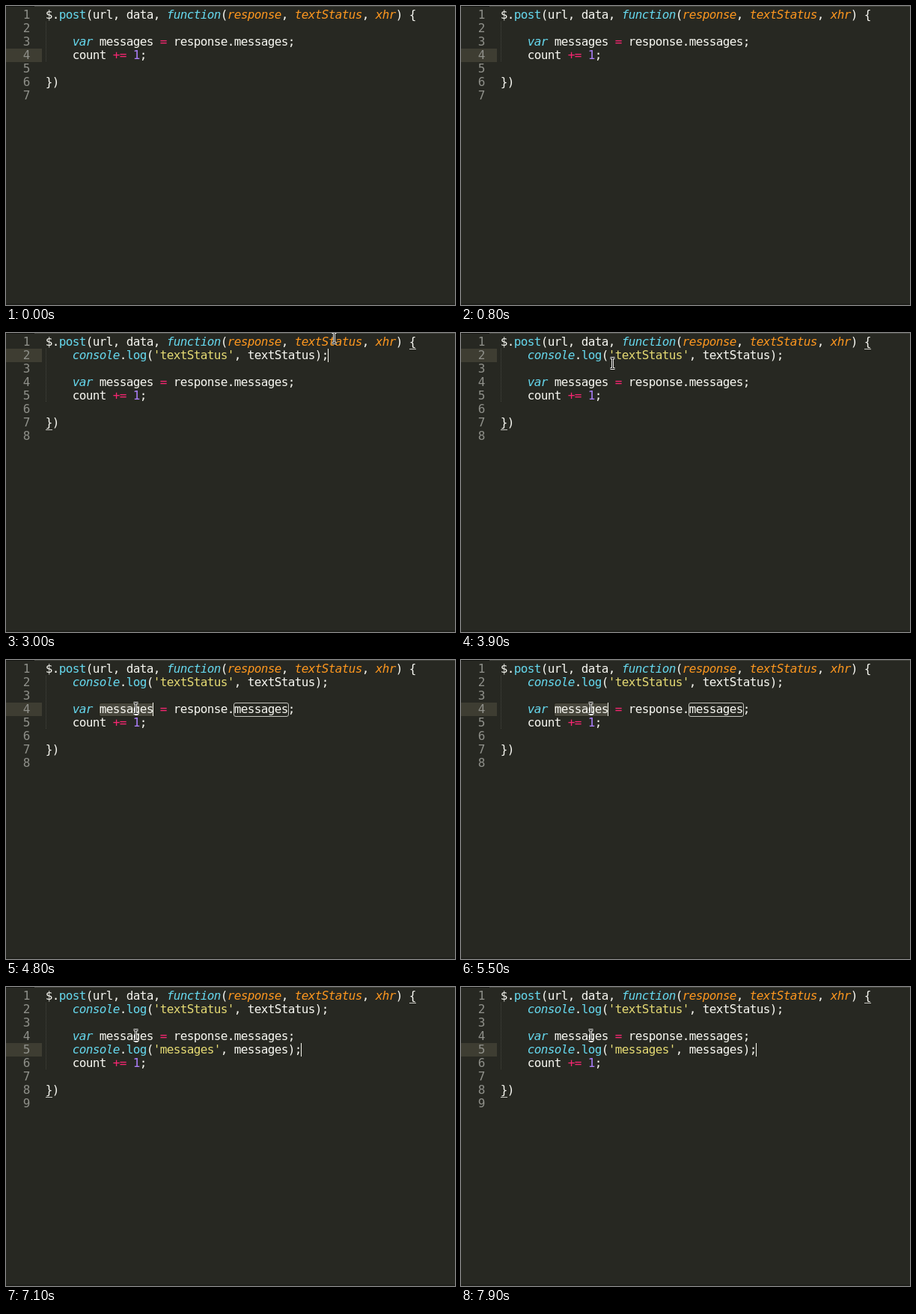
An HTML page with a canvas that plays this animation: 600x400 px, repeating every 8 s.

```html
<!DOCTYPE html>
<html lang="en">
<head>
<meta charset="utf-8">
<title>Code editor</title>
<style>
  html, body { margin: 0; width: 600px; height: 400px; overflow: hidden; background: #272822; }
  canvas { display: block; }
</style>
</head>
<body>
<canvas width="600" height="400"></canvas>
<script>
const ctx = document.querySelector('canvas').getContext('2d');
const LOOP = 8000, STEP = 100, BLINK = 1040;
const LEFT = 53, TOP = 3, ROW = 18, COL = 9;
const FONT = '16px "DejaVu Sans Mono", monospace';

// Tighten the tracking so that every character fills one column.
ctx.font = FONT;
const TRACKING = COL - ctx.measureText('0').width;

const COLORS = { w: '#f8f8f2', c: '#66d9ef', i: '#66d9ef', o: '#fd971f', p: '#f92672', n: '#ae81ff', y: '#e6db74' };
const ITALIC = 'io';

// Each part of a line starts with its style letter.
const HEAD = 'w$.|cpost|w(url, data, |ifunction|w(|oresponse|w, |otextStatus|w, |oxhr|w) {';
const VAR = 'w    |ivar|w messages |p=|w response.messages;';
const COUNT = 'w    count |p+=|w |n1|w;';
const log = name => `w    |iconsole|w.|clog|w(|y'${name}'|w, ${name});`;

function codeAt(t) {
  const lines = [HEAD, 'w', VAR, COUNT, 'w', 'w})', 'w'];
  if (t >= 2900) lines.splice(1, 0, log('textStatus'));
  if (t >= 5800) lines.splice(4, 0, log('messages'));
  return lines;
}

// Caret position, start of its blink, and the first selected column
const CARETS = [
  { at: 0, row: 3, col: 15, blink: -840 },
  { at: 1400, row: 0, col: 43 },
  { at: 1500, row: 0, col: 47, select: 37 },
  { at: 2900, row: 1, col: 42 },
  { at: 4400, row: 3, col: 16, select: 8 },
  { at: 5800, row: 4, col: 38 }
];

// Pointer path: time, x, y
const PATH = [[900, 440, -12], [1200, 438, 6], [3300, 438, 6], [3900, 202, 40], [4200, 173, 64], [LOOP, 173, 64]];

const colX = col => LEFT + col * COL;
const rowY = row => TOP + row * ROW;

function rect(color, x, y, w, h) {
  ctx.fillStyle = color;
  ctx.fillRect(x, y, w, h);
}

function text(str, x, row, color, italic) {
  ctx.font = (italic ? 'italic ' : '') + FONT;
  ctx.letterSpacing = TRACKING + 'px';
  ctx.fillStyle = color;
  ctx.fillText(str, x + TRACKING / 2, rowY(row) + 14);
}

function drawLine(line, row) {
  let col = 0;
  for (const part of line.split('|')) {
    const str = part.slice(1);
    text(str, colX(col), row, COLORS[part[0]], ITALIC.includes(part[0]));
    col += str.length;
  }
}

function wordBox(row, from, to, stroke, fill) {
  ctx.beginPath();
  ctx.roundRect(colX(from) - .5, rowY(row) + .5, (to - from) * COL + 1, ROW, 2.5);
  if (fill) {
    ctx.fillStyle = fill;
    ctx.fill();
  }
  ctx.strokeStyle = stroke;
  ctx.lineWidth = 1;
  ctx.stroke();
}

function underline(row, col) {
  rect('#c8c8c2', colX(col), rowY(row) + ROW, COL, 1);
}

function drawPointer(t) {
  const k = PATH.findIndex(p => p[0] > t);
  if (k < 1) return;
  const [t0, x0, y0] = PATH[k - 1], [t1, x1, y1] = PATH[k];
  const f = (t - t0) / (t1 - t0);
  const x = Math.round(x0 + (x1 - x0) * f) + .5;
  const y = Math.round(y0 + (y1 - y0) * f) + .5;
  ctx.beginPath();
  for (const side of [-1, 1]) {
    ctx.moveTo(x - 3, y + side * 7);
    ctx.lineTo(x + 3, y + side * 7);
  }
  ctx.moveTo(x, y - 7);
  ctx.lineTo(x, y + 7);
  for (const [color, width] of [['#f4f4f0', 3], ['#111', 1]]) {
    ctx.strokeStyle = color;
    ctx.lineWidth = width;
    ctx.stroke();
  }
}

function draw(t) {
  const lines = codeAt(t);
  const caret = CARETS.findLast(c => c.at <= t);
  const caretY = rowY(caret.row);

  rect('#272822', 0, 0, 600, 400);
  rect('#151612', 0, 0, 38, 1);
  rect('#41423d', 38, 0, 562, 1);
  rect('#20211c', 0, 398, 600, 2);
  rect('#3e3d32', 0, caretY, 48, ROW);

  // Indent guide
  for (let y = rowY(1); y < rowY(lines.length - 3); y += 2) rect('#46473f', LEFT, y, 1, 1);

  if (caret.select) wordBox(caret.row, caret.select, caret.col, '#222218', '#49483e');

  lines.forEach((line, row) => {
    text(String(row + 1), 23, row, '#8f908a');
    drawLine(line, row);
  });

  // Matching braces
  if (t >= 2900 && t < 4800 || t >= 5800) {
    underline(0, 54);
    underline(lines.length - 2, 0);
  }

  // Other occurrence of the selected word
  if (t >= 4800 && t < 5800) wordBox(3, 28, 36, '#c4c4be');

  if ((t - (caret.blink ?? caret.at)) % BLINK < BLINK / 2) rect('#f8f8f0', colX(caret.col) - 1, caretY, 1, ROW);
  drawPointer(t);
}

const start = performance.now();
function tick() {
  const t = (performance.now() - start) % LOOP;
  draw(Math.floor(t / STEP) * STEP);
  requestAnimationFrame(tick);
}
tick();
</script>
</body>
</html>
```
